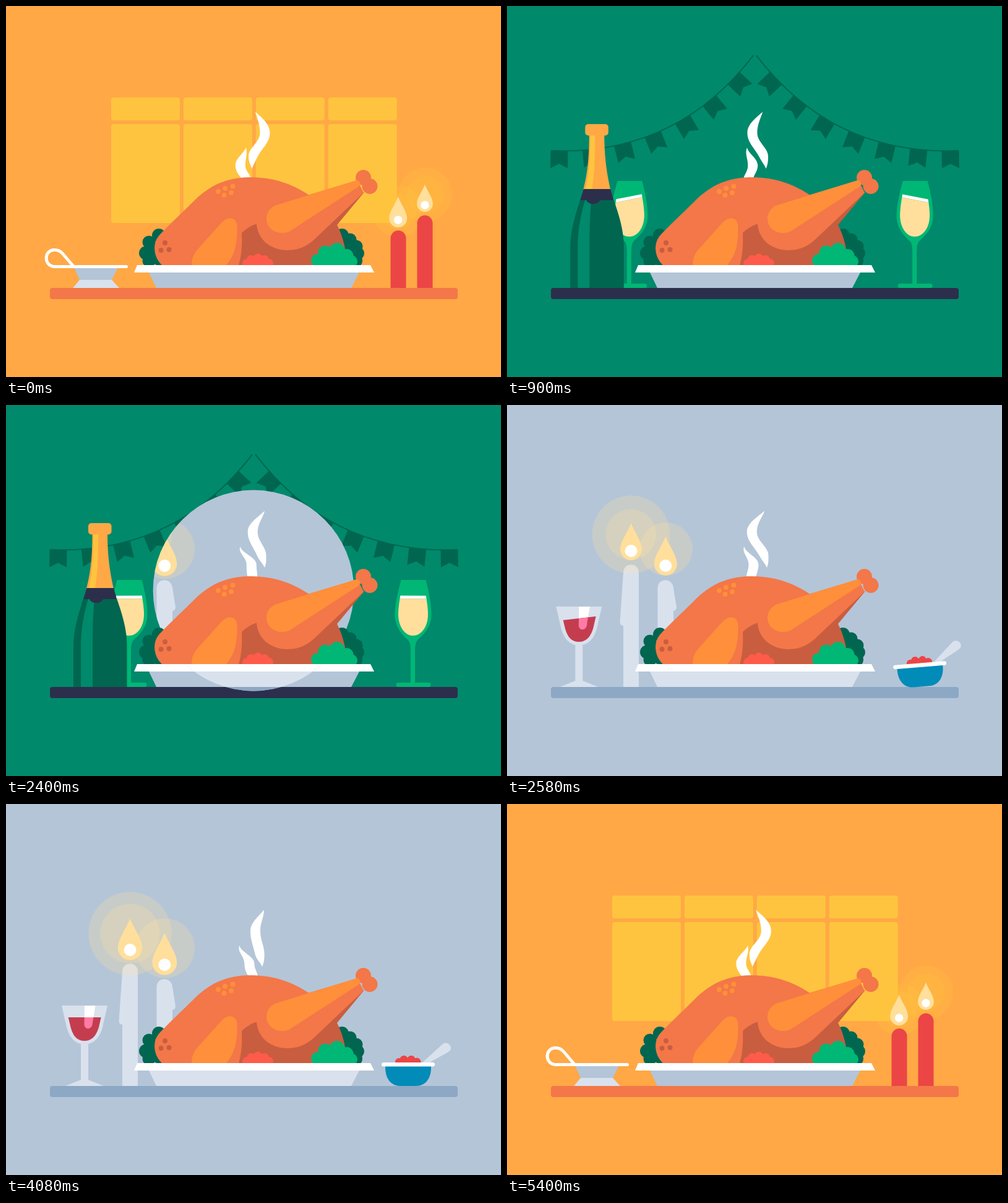
Recreate the animation shown at these times as an HTML page with a canvas. Size 800 by 600 pixels, loop 5.43 s.

```html
<!DOCTYPE html>
<html lang="en">
<head>
<meta charset="utf-8">
<title>Festive dinner</title>
<style>
html, body { margin: 0; width: 100%; height: 100%; overflow: hidden; }
canvas { display: block; width: 800px; height: 600px; }
</style>
</head>
<body>
<canvas id="stage" width="800" height="600"></canvas>
<script>
const ctx = document.getElementById('stage').getContext('2d');
const LOOP = 5430, SCENE = 1810, FIRST_WIPE = 533, WIPE_SPEED = 2.8;
const TAU = Math.PI * 2, DEG = Math.PI / 180;

const C = {
  orange: '#ffa845', yellow: '#ffc43f', roast: '#f37748', glaze: '#ff8f3a', shade: '#c95d40',
  green: '#00896b', dark: '#006650', leaf: '#00b775', navy: '#2c2f4c',
  grey: '#b4c5d8', slate: '#8da8c4', pale: '#d9e1ed',
  red: '#ec4545', berry: '#ff5b4a', cream: '#ffdf9b', white: '#ffffff',
  wine: '#c43d4f', pink: '#ff7ba6', blue: '#008bb8'
};

// helpers
const wave = (t, peak, period) => Math.cos(TAU * (t - peak) / period);
const settle = (t, length, power) => Math.pow(Math.max(0, 1 - t / length), power);

function fill(color, d) {
  ctx.fillStyle = color;
  ctx.fill(typeof d === 'string' ? new Path2D(d) : d);
}
function disc(color, x, y, r) {
  ctx.fillStyle = color;
  ctx.beginPath();
  ctx.arc(x, y, r, 0, TAU);
  ctx.fill();
}
function discs(color, list) {
  list.forEach(([x, y, r = 4]) => disc(color, x, y, r));
}
function box(color, x, y, w, h, r = 0) {
  ctx.fillStyle = color;
  ctx.beginPath();
  ctx.roundRect(x, y, w, h, r);
  ctx.fill();
}
function group(draw, x = 0, y = 0, angle = 0) {
  ctx.save();
  ctx.translate(x, y);
  ctx.rotate(angle);
  draw();
  ctx.restore();
}

function table(shelf, dish) {
  box(shelf, 71, 456, 659, 18, 4);
  fill(dish, 'M231 431H571L558 456H243Z');
  fill(C.white, 'M212 419H589L595 431H207Z');
}

function glow(color, x, y, outer, inner) {
  ctx.globalAlpha = 0.25;
  disc(color, x, y, outer);
  disc(color, x, y, inner);
  ctx.globalAlpha = 1;
}
function flame(x, y, r, dot) {
  const cy = y - r / 3, tip = y - 2.75 * r;
  const p = new Path2D();
  p.moveTo(x, tip);
  p.bezierCurveTo(x + r * 0.35, tip + r * 0.9, x + r, cy - r * 0.75, x + r, cy);
  p.arc(x, cy, r, 0, Math.PI);
  p.bezierCurveTo(x - r, cy - r * 0.75, x - r * 0.35, tip + r * 0.9, x, tip);
  fill(C.cream, p);
  disc(C.white, x, y - dot / 3, dot);
}

// warm kitchen
function gravyBoat(t) {
  const tilt = -10.3 * DEG * Math.pow(Math.max(0, 560 - t) / 393, 1.3);
  const fall = -98 * Math.max(0, 1 - (t / 290) ** 2);
  const lift = -37.5 * Math.abs(Math.sin(tilt));
  group(() => {
    ctx.translate(-145.5, -456);
    fill(C.grey, 'M110 423H181L171 443H119Z');
    fill(C.pale, 'M119 443H171L183 456H108Z');
    ctx.strokeStyle = C.white;
    ctx.lineWidth = 5;
    ctx.lineCap = ctx.lineJoin = 'round';
    ctx.stroke(new Path2D('M194.5 421.5H78C61 420 61 396 77 394.5C84 394 88 396 92 401L109 421'));
  }, 145.5, 456 + Math.min(fall, lift), tilt);
}
function kitchen(t) {
  box(C.orange, 0, 0, 800, 600);
  for (let i = 0; i < 4; i++) {
    const x = 170 + i * 116.9;
    box(C.yellow, x, 148, 111, 37, 4);
    box(C.yellow, x, 191, 111, 160, 4);
  }
  const f = wave(t, 167, 730), left = 13 - 1.5 * f, right = 13.5 + 0.6 * f;
  glow(C.yellow, 634, 332, left * 2.9, left * 2);
  glow(C.yellow, 677.5, 305, 18 + right * 2, right * 2.35);
  box(C.red, 621.5, 363, 25, 95, [12.5, 12.5, 0, 0]);
  box(C.red, 664.5, 338.5, 25, 119, [12.5, 12.5, 0, 0]);
  flame(633.7, 348.3, left, 6.7);
  flame(677, 324.3, right, 6.7);
  table(C.roast, C.grey);
  gravyBoat(t);
}

// green party
function bunting() {
  const xs = [71, 170, 295, 398], ys = [234, 238, 214, 80];
  const at = (p, t) => {
    const u = 1 - t;
    return u * u * u * p[0] + 3 * u * u * t * p[1] + 3 * u * t * t * p[2] + t * t * t * p[3];
  };
  ctx.strokeStyle = C.dark;
  ctx.lineWidth = 2;
  ctx.lineCap = 'butt';
  ctx.stroke(new Path2D('M71 234C170 238 295 214 398 80'));
  [0.045, 0.208, 0.363, 0.508, 0.65, 0.78, 0.9].forEach(t => {
    const dx = at(xs, t + 0.01) - at(xs, t - 0.01), dy = at(ys, t + 0.01) - at(ys, t - 0.01);
    group(() => fill(C.dark, 'M-14 0H14V28L0 21L-14 28Z'), at(xs, t), at(ys, t), Math.atan2(dy, dx));
  });
}
function bottle() {
  fill(C.dark, 'M125 313C115 345 109 365 109 392V456H195.5V392C195.5 365 190 345 179 313Z');
  fill(C.green, 'M133 313C124 345 121 365 121 395V456H140V385C140 355 141 335 143 313Z');
  fill(C.orange, 'M139.5 207H164C164 245 168 270 174 297H130C137 270 139.5 245 139.5 207Z');
  fill(C.yellow, 'M141 209H149C149 250 148 275 144 296H134C140 268 141 240 141 209Z');
  box(C.orange, 133, 191, 37.5, 18.5, 5);
  fill(C.navy, 'M130.5 296H174L179 314H157C154 322 138 322 135 314H125Z');
}
function flute(tilt) {
  fill(C.leaf, 'M-19 283H21C27 305 30 324 30 339C30 361 16 372 7 381C4 385 3.5 391 3.5 399V449H26Q29 449 29 452.5Q29 456 26 456H-24Q-27 456 -27 452.5Q-27 449 -24 449H-3.5V399C-3.5 391 -4 385 -7 381C-16 372 -29 361 -29 339C-29 324 -25 305 -19 283Z');
  ctx.save();
  ctx.clip(new Path2D('M-18 296H19C22 312 24.5 328 24.5 338C24.5 360 13 373 0 373C-12 373 -23.5 360 -23.5 338C-23.5 328 -21 312 -18 296Z'));
  group(() => {
    box(C.white, -50, 0, 100, 5);
    box(C.cream, -50, 5, 100, 90);
  }, 0, 308.3, tilt);
  ctx.restore();
}
function party(t) {
  box(C.green, 0, 0, 800, 600);
  bunting();
  group(() => { ctx.scale(-1, 1); bunting(); }, 801, 0);
  const slide = 240 * settle(t, 500, 4);
  const tilt = 25 * DEG * Math.exp(-t / 450) * wave(t, 367, 480);
  group(() => flute(-tilt), 198.5 - slide, 0);
  group(() => flute(tilt), 657.5 + slide, 0);
  table(C.navy, C.grey);
  group(bottle, -300 * settle(t, 600, 4), 0);
}

// winter table
function wineGlass(tilt) {
  fill(C.pale, 'M90 326H164L156 361C151 381 139 387 133 388V446L158 456H96L121 446V388C115 387 103 381 98 361Z');
  const shine = 'M127 326H144.5L140 353C140 366 126.5 366 126.5 356Z';
  fill(C.white, shine);
  ctx.save();
  ctx.clip(new Path2D('M97 330H157L150 361C145 378 136 383 127 383C117 383 109 378 104.5 361Z'));
  group(() => {
    ctx.beginPath();
    ctx.rect(-60, 0, 120, 80);
  }, 127, 345, tilt);
  ctx.clip();
  box(C.wine, 80, 320, 100, 80);
  fill(C.pink, shine);
  ctx.restore();
}
function sauceBowl(t) {
  const k = Math.pow(Math.max(0, 900 - t) / 663, 1.35);
  const fly = 400 * settle(t, 230, 3);
  group(() => {
    ctx.translate(-650, -456);
    fill(C.pale, 'M672 419L706 388C713 383 723 392 717.5 399C710 405 695 411 684 419Z');
    discs(C.red, [[635, 417, 6], [643, 413, 6.2], [655, 413, 6.2], [664, 417, 6.5], [649, 417, 7]]);
    fill(C.blue, 'M613 422H687V426C687 445 677 456 663 456H637C623 456 613 445 613 426Z');
    box(C.white, 607, 418, 86, 6.5, 3.2);
  }, 650 + 20 * k + fly, 456 - Math.min(k, 1) * 0.6, -4.7 * DEG * Math.min(k, 1.3));
}
function winter(t) {
  box(C.grey, 0, 0, 800, 600);
  fill(C.pale, 'M188 271C188 254 213 254 213 271V456H188V357Q182 356 182.5 351Z');
  fill(C.pale, 'M243.5 296C243.5 279 268 279 269 296L274 327Q274 332 269 333V456H243.5Z');
  const f = wave(t, 237, 560), left = 19 - 1.5 * f, right = 19.5 - f;
  glow(C.cream, 200.5, 209.5, 28 + left * 2, left * 3.33 - 17.3);
  ctx.globalAlpha = 0.25;
  disc(C.cream, 257, 233, right * 3.5 - 21.7);
  ctx.globalAlpha = 1;
  flame(200.5, 239.3, left, 10);
  flame(256.3, 263.3, right, 10);
  table(C.slate, C.pale);
  const tilt = -11 * DEG * Math.exp(-t / 450) * wave(t, 237, 560);
  group(() => wineGlass(tilt), -240 * settle(t, 440, 4), 0);
  sauceBowl(t);
}

// steam bends as a travelling wave
function steam(t) {
  const w = peak => wave(t, peak, SCENE);
  const tip = 408 + 10 * w(610), end = 408 + 12 * w(760);
  const k = 1.07 * w(800), up = 407.5 - 11 * k, low = 407 + 7.5 * k;
  const p = new Path2D();
  const edge = (side, down) => {
    const u = up + 8 * side, v = low + 7.5 * side;
    const lean = 4 * (side > 0 ? Math.min(k, 0) : Math.max(k, 0));
    const bend = tip - 7 * k + 4 * side;
    if (down) {
      p.bezierCurveTo(bend, 181, u, 191, u, 205);
      p.bezierCurveTo(u, 221, v - lean * 1.8, 229, v, 243);
      p.bezierCurveTo(v + lean, 251, end + 3 * side, 256, end, 263);
    } else {
      p.bezierCurveTo(end + 3 * side, 256, v + lean, 251, v, 243);
      p.bezierCurveTo(v - lean * 1.8, 229, u, 221, u, 205);
      p.bezierCurveTo(u, 191, bend, 181, tip, 171);
    }
  };
  p.moveTo(tip, 171);
  edge(1, true);
  edge(-1, false);
  fill(C.white, p);

  const q = w(450), top = 388 - 10.8 * q, base = 388.5 + 10.8 * q, mid = 388 + 10.5 * w(760);
  const s = new Path2D();
  s.moveTo(top, 229);
  s.bezierCurveTo(top + 3, 240, mid + 8, 246, mid + 8, 258);
  s.bezierCurveTo(mid + 8, 268, base + 9, 274, base + 8, 284);
  s.lineTo(base - 5, 284);
  s.bezierCurveTo(base - 9, 275, mid - 8, 270, mid - 8, 258);
  s.bezierCurveTo(mid - 8, 246, top - 4, 239, top, 229);
  fill(C.white, s);
}

function turkey() {
  ctx.save();
  ctx.beginPath();
  ctx.rect(0, 0, 800, 419);
  ctx.clip();
  discs(C.dark, [[247, 371, 11], [231, 382, 10.5], [226, 399.5, 11], [231, 412, 10.5], [250, 400, 20],
    [543, 371, 11], [556, 378, 10.5], [566, 389, 10.5], [568.5, 400, 10.5], [565, 412, 11], [545, 400, 20]]);
  fill(C.roast, 'M253 420C239 408 236 386 246 373C255 362 281 338 306 313C336 284 366 277 397 277C437 277 468 291 490 306C526 333 545 372 552 420Z');
  fill(C.shade, 'M376 420C381 402 382 385 381 367C388 360 398 354 406 352L500 330L579 301L535 354C545 373 550 397 552 420Z');
  fill(C.roast, 'M568 282L440 320C415 328 405 340 405 353C407 378 428 395 455 395C476 395 490 386 503 373L578 302Z');
  discs(C.roast, [[577.5, 277.5, 12.5], [588, 291.5, 12.5]]);
  fill(C.glaze, 'M437 322L566 282C572 281 574 288 570 292L459 364C444 372 421 364 421 344C421 333 428 325 437 322Z');
  fill(C.glaze, 'M300 420C300 408 303 400 312 391L346 353C358 338 374 341 373.5 358C374 380 371 404 355 420Z');
  discs(C.glaze, [[343, 300], [354, 295], [366.5, 291.5], [352.5, 306], [364, 302]]);
  discs(C.shade, [[257, 383], [250.5, 395], [263.5, 394]]);
  discs(C.leaf, [[503.5, 411.5, 10.5], [516, 399, 11.5], [535, 395.5, 12.5], [550.5, 404, 11], [558, 413, 10], [530, 412, 20]]);
  discs(C.berry, [[389, 416, 7], [396, 410, 7], [407, 408, 7.5], [418, 410, 7], [425, 416, 7], [407, 416, 12]]);
  ctx.restore();
}

const scenes = [party, winter, kitchen];

function draw(now) {
  const t = now % LOOP;
  const since = (t - FIRST_WIPE + LOOP) % LOOP;
  const i = Math.floor(since / SCENE), local = since % SCENE;
  const radius = local * WIPE_SPEED;
  if (radius < 500) scenes[(i + 2) % 3](local + SCENE);
  ctx.save();
  if (radius < 500) {
    ctx.beginPath();
    ctx.arc(400, 300, radius, 0, TAU);
    ctx.clip();
  }
  scenes[i](local);
  ctx.restore();
  steam(t);
  turkey();
}

const start = performance.now();
function tick() {
  draw(performance.now() - start);
  requestAnimationFrame(tick);
}
tick();
</script>
</body>
</html>
```
